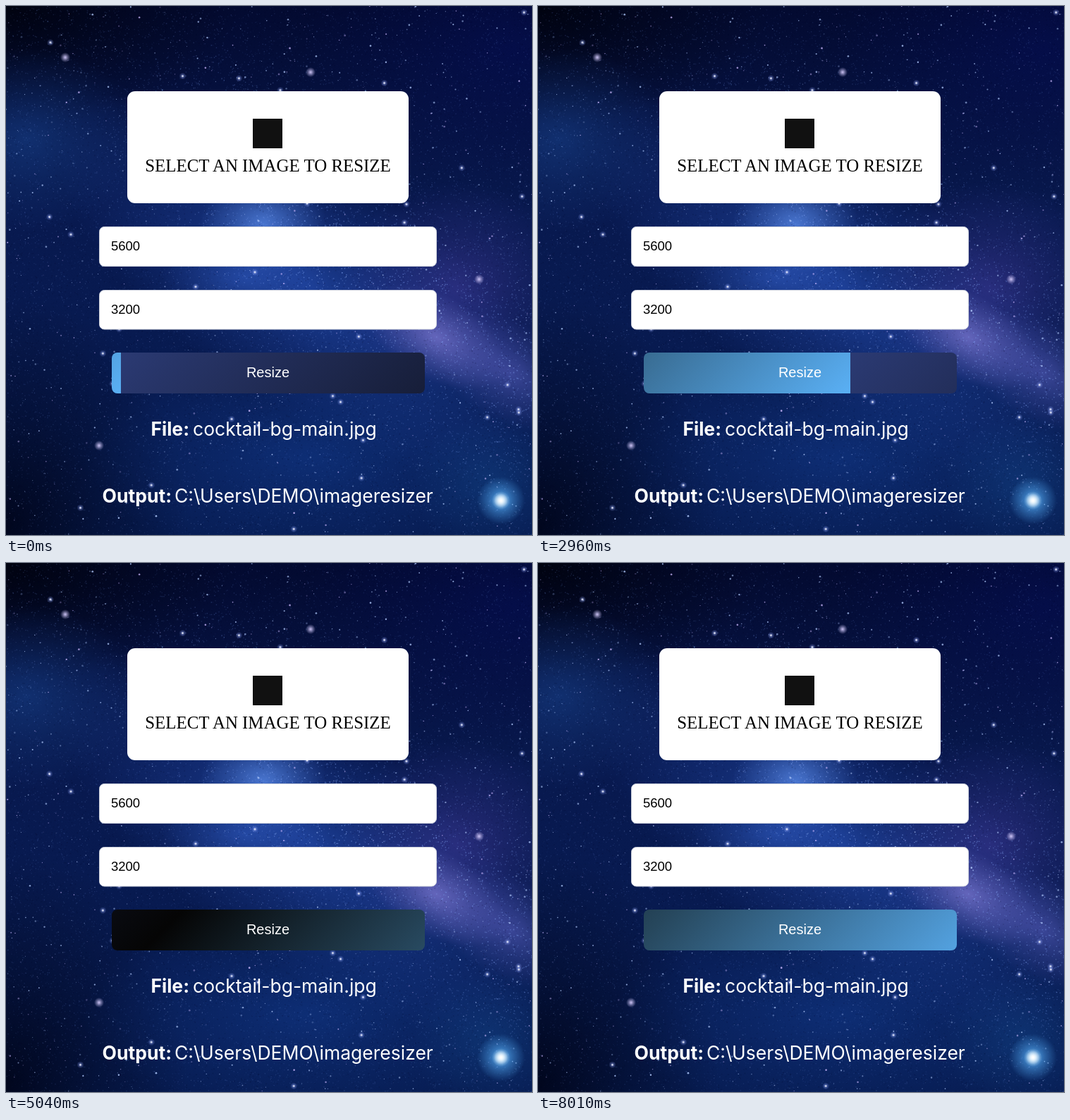
An HTML page with a canvas that plays this animation: 746 by 751 pixels, repeating every 8050 ms.

```html
<!DOCTYPE html>
<html lang="en">
<head>
<meta charset="utf-8">
<title>Image resizer</title>
<style>
  html, body { margin: 0; width: 100%; height: 100%; overflow: hidden; background: #051240; }
  canvas, svg, #button { position: absolute; left: 0; top: 0; }
  #button {
    left: 150px; top: 492px; width: 444px; height: 57.5px; border-radius: 8px;
    background: linear-gradient(135deg, #2b3a73, #050505 50%, #27485e 71%, #5ab0f5) 0 0 / 400% 100%;
  }
  .sans { font-family: "Liberation Sans", Arial, sans-serif; }
  .title { font: 24.9px "Liberation Serif", "Times New Roman", serif; }
  .info { font: 26.5px Inter, sans-serif; fill: #fff; }
  .info .label { font-weight: 700; text-anchor: end; }
</style>
</head>
<body>
<canvas id="sky" width="746" height="751"></canvas>
<div id="button"></div>
<svg width="746" height="751">
  <rect x="172" y="121" width="399" height="159" rx="11" fill="#fff"/>
  <rect x="350" y="160" width="42" height="42" fill="#111"/>
  <text class="title" x="371.5" y="235" text-anchor="middle">SELECT AN IMAGE TO RESIZE</text>
  <g fill="#fff" stroke="#ccd0dc">
    <rect x="132.5" y="313.5" width="478" height="56" rx="7"/>
    <rect x="132.5" y="403.5" width="478" height="55.5" rx="7"/>
  </g>
  <g class="sans" font-size="18.5">
    <text x="149" y="347">5600</text>
    <text x="149" y="437">3200</text>
  </g>
  <text class="sans" x="371.5" y="527" font-size="20" fill="#fff" text-anchor="middle">Resize</text>
  <g class="info">
    <text class="label" x="260" y="610">File:</text>
    <text x="265" y="610">cocktail-bg-main.jpg</text>
    <text class="label" x="235" y="705">Output:</text>
    <text x="239" y="705">C:\Users\DEMO\imageresizer</text>
  </g>
</svg>
<script>
const W = 746, H = 751;
const ctx = document.getElementById('sky').getContext('2d');
const button = document.getElementById('button');

let seed = 7;
function random() {
  seed = (seed * 1664525 + 1013904223) % 4294967296;
  return seed / 4294967296;
}

function glow(x, y, rx, ry, rgb, alpha, angle = 0) {
  const g = ctx.createRadialGradient(0, 0, 0, 0, 0, 1);
  g.addColorStop(0, `rgba(${rgb},${alpha})`);
  g.addColorStop(0.5, `rgba(${rgb},${alpha * 0.45})`);
  g.addColorStop(1, `rgba(${rgb},0)`);
  ctx.save();
  ctx.translate(x, y);
  ctx.rotate(angle);
  ctx.scale(rx, ry);
  ctx.fillStyle = g;
  ctx.fillRect(-1, -1, 2, 2);
  ctx.restore();
}

// Strength of the milky way, which runs from the centre to the lower right
function band(x, y) {
  const across = ((x - 330) * 290 - (y - 250) * 416) / 507;
  return Math.exp(-((across / 120) ** 2)) * Math.min(1, Math.max(0.15, (x - 150) / 200));
}

function drawSky() {
  const base = ctx.createLinearGradient(0, 0, 0, H);
  base.addColorStop(0, '#030a30');
  base.addColorStop(0.4, '#08194f');
  base.addColorStop(1, '#071c52');
  ctx.fillStyle = base;
  ctx.fillRect(0, 0, W, H);

  glow(0, 0, 330, 170, '0,2,12', 0.9);
  glow(0, 740, 260, 330, '0,4,24', 0.9);
  glow(720, 60, 300, 200, '5,14,90', 0.5);
  glow(30, 190, 170, 130, '24,66,140', 0.6);
  glow(430, 400, 420, 170, '36,76,176', 0.7, 0.6);
  glow(365, 310, 90, 70, '90,140,235', 0.75);
  glow(340, 385, 120, 60, '50,95,200', 0.5);
  glow(640, 400, 170, 150, '70,60,160', 0.5);
  glow(610, 470, 110, 60, '130,125,215', 0.7, 0.5);
  glow(715, 520, 130, 70, '90,95,190', 0.6, 0.5);
  glow(430, 640, 320, 150, '18,58,140', 0.6);
  glow(690, 680, 120, 100, '20,72,140', 0.5);

  // Fine grain, denser and brighter inside the band
  for (let i = 0; i < 26000; i++) {
    const x = random() * W, y = random() * H, light = random();
    const alpha = light * light * (0.16 + 0.42 * band(x, y));
    ctx.fillStyle = light < 0.35 ? `rgba(0,5,40,${0.25 * random()})` : `rgba(130,165,245,${alpha})`;
    ctx.fillRect(x, y, 1.4, 1.4);
  }

  for (let i = 0; i < 1500; i++) {
    const size = 0.5 + 0.9 * random() ** 3;
    ctx.fillStyle = `rgba(${random() < 0.3 ? '205,185,255' : '180,205,255'},${0.2 + 0.65 * random()})`;
    ctx.beginPath();
    ctx.arc(random() * W, random() * H, size, 0, 7);
    ctx.fill();
  }
  for (let i = 0; i < 40; i++) {
    const x = random() * W, y = random() * H;
    glow(x, y, 5, 5, '150,170,255', 0.7);
    glow(x, y, 2.2, 2.2, '255,255,255', 1);
  }
  for (const [x, y] of [[84, 73], [432, 94], [671, 388], [132, 624]]) glow(x, y, 7, 7, '215,205,255', 0.95);

  glow(702, 702, 34, 34, '90,180,255', 0.9);
  glow(702, 702, 13, 13, '235,250,255', 1);
  glow(702, 702, 10, 10, '255,255,255', 1);
}

const LOOP = 8050;
// [time, x of the gradient seam]: drifts left, then turns back
const seam = [[0, 163], [1560, -668], [2480, -1078], [3440, -1588], [5246, -2551],
              [7290, -1461], [7650, -1285], [LOOP, -1090]];

function seamAt(t) {
  const i = seam.findIndex(([time]) => time > t);
  const [t0, x0] = seam[i - 1], [t1, x1] = seam[i];
  return x0 + (x1 - x0) * (t - t0) / (t1 - t0);
}

function frame() {
  const t = performance.now() % LOOP;
  const shift = t > 6200 ? 10 : 0;
  const stepped = Math.floor((t - shift) / 40) * 40 + shift;
  button.style.backgroundPositionX = seamAt(stepped) - 150 + 'px';
  requestAnimationFrame(frame);
}

drawSky();
frame();
</script>
</body>
</html>
```
